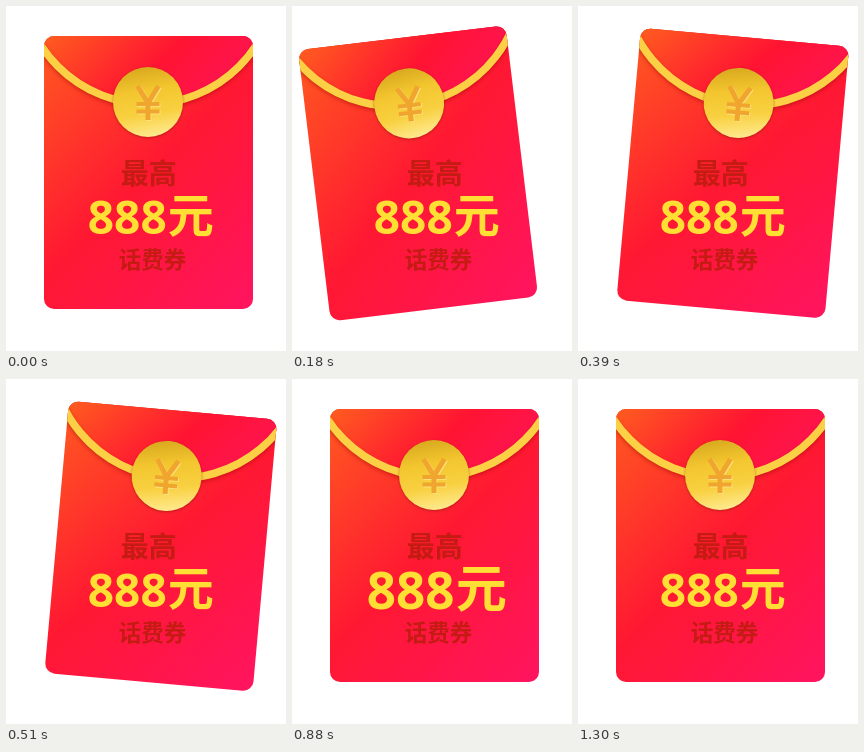
An HTML page with a canvas for the animation above (1.33 s loop, 280x345 px).

```html
<!DOCTYPE html>
<html lang="zh-CN">
<head>
<meta charset="utf-8">
<style>
  html, body { margin: 0; width: 100%; height: 100%; overflow: hidden; background: #fff; }
  canvas { display: block; }
</style>
</head>
<body>
<canvas id="stage" width="280" height="345"></canvas>
<script>
const ctx = document.getElementById('stage').getContext('2d');

const LOOP = 1330, STEP = 30;
const HOLD_START = 600, HOLD = 100;
const SWING = 8.6 * Math.PI / 180;
const GROWTH = 0.185;
const CARD = { x: 38, y: 30, w: 209, h: 273, r: 10 };
const FLAP = { x: 142.5, y: -30, r: 128 };
const PIVOT = { x: 141, y: 303.4 };
const COIN = { x: 142, y: 96, r: 35 };
const CJK = '"Noto Sans CJK SC", "Noto Sans CJK", sans-serif';
const LATIN = '"Noto Sans", "Open Sans", sans-serif';
const DARK_RED = '#c41b13', YELLOW = '#ffdf33';

// Triangle wave: 0 -> 1 -> 0 as p goes 0 -> 1.
const triangle = p => 1 - Math.abs(2 * p - 1);

function gradient(x0, y0, x1, y1, colors) {
  const g = ctx.createLinearGradient(x0, y0, x1, y1);
  colors.forEach((c, i) => g.addColorStop(i / (colors.length - 1), c));
  return g;
}

function shadow(color, blur, dy) {
  ctx.shadowColor = color;
  ctx.shadowBlur = blur;
  ctx.shadowOffsetY = dy;
}

function label(text, x, y, size, color, family = CJK, align = 'center') {
  ctx.font = `bold ${size}px ${family}`;
  ctx.textAlign = align;
  ctx.fillStyle = color;
  ctx.fillText(text, x, y);
}

function drawFlap() {
  ctx.save();
  shadow('rgba(150, 0, 0, 0.4)', 4, 2);
  ctx.beginPath();
  ctx.arc(FLAP.x, FLAP.y, FLAP.r, 0, Math.PI);
  ctx.fillStyle = gradient(74, 0, 211, 137, ['#ff5a20', '#ff1432', '#ff1460']);
  ctx.fill();
  ctx.lineWidth = 7.6;
  ctx.strokeStyle = '#fbd044';
  ctx.stroke();
  ctx.restore();
}

function yenPath(dx, dy, color) {
  ctx.save();
  ctx.translate(COIN.x + dx, COIN.y + dy);
  ctx.strokeStyle = color;
  ctx.beginPath();
  ctx.moveTo(-10.5, -16);
  ctx.lineTo(0, 1);
  ctx.lineTo(10.5, -16);
  ctx.moveTo(0, 0);
  ctx.lineTo(0, 18);
  ctx.lineWidth = 5;
  ctx.stroke();
  ctx.beginPath();
  for (const y of [2, 9.5]) {
    ctx.moveTo(-11.5, y);
    ctx.lineTo(11.5, y);
  }
  ctx.lineWidth = 4;
  ctx.stroke();
  ctx.restore();
}

function drawCoin() {
  const { x, y, r } = COIN;
  ctx.save();
  shadow('rgba(120, 20, 0, 0.5)', 3, 1);
  ctx.beginPath();
  ctx.arc(x, y, r, 0, Math.PI * 2);
  ctx.fillStyle = gradient(x - 6, y - r, x + 6, y + r, ['#d9a91e', '#f3c62f', '#f8d040', '#ffea90']);
  ctx.fill();
  ctx.restore();
  yenPath(1, 1, '#fde07c');
  yenPath(0, 0, '#f0a52e');
}

function drawCard(angle) {
  const { x, y, w, h, r } = CARD;
  ctx.save();
  ctx.translate(PIVOT.x, PIVOT.y);
  ctx.rotate(angle);
  ctx.translate(-PIVOT.x, -PIVOT.y);

  ctx.save();
  ctx.beginPath();
  ctx.roundRect(x, y, w, h, r);
  ctx.fillStyle = gradient(22, 46, 263, 287, ['#ff5a20', '#ff1832', '#ff1460']);
  ctx.fill();
  ctx.clip();
  drawFlap();
  ctx.restore();

  drawCoin();
  ctx.restore();
}

function drawAmount(scale) {
  ctx.save();
  ctx.translate(145.3, 212);
  ctx.scale(scale, scale);
  label('888', -63.5, 16.2, 46, YELLOW, LATIN, 'left');
  label('元', 16.5, 14.3, 46, YELLOW, CJK, 'left');
  ctx.restore();
}

function draw(now) {
  const t = now % LOOP;
  const active = t < HOLD_START ? t : Math.max(HOLD_START, t - HOLD);
  const time = Math.floor(active / STEP) * STEP;

  let angle = 0, scale = 1;
  if (time < 300) angle = -SWING * triangle(time / 300);
  else if (time < 600) angle = SWING * triangle((time - 300) / 300);
  else scale = 1 + GROWTH * triangle((time - 600) / 600);

  ctx.fillStyle = '#fff';
  ctx.fillRect(0, 0, 280, 345);
  drawCard(angle);
  label('最高', 142.7, 178.3, 28, DARK_RED);
  label('话费券', 146.5, 261.8, 22.5, DARK_RED);
  drawAmount(scale);
}

const start = performance.now();
function tick() {
  draw(performance.now() - start);
  requestAnimationFrame(tick);
}
tick();
</script>
</body>
</html>
```
